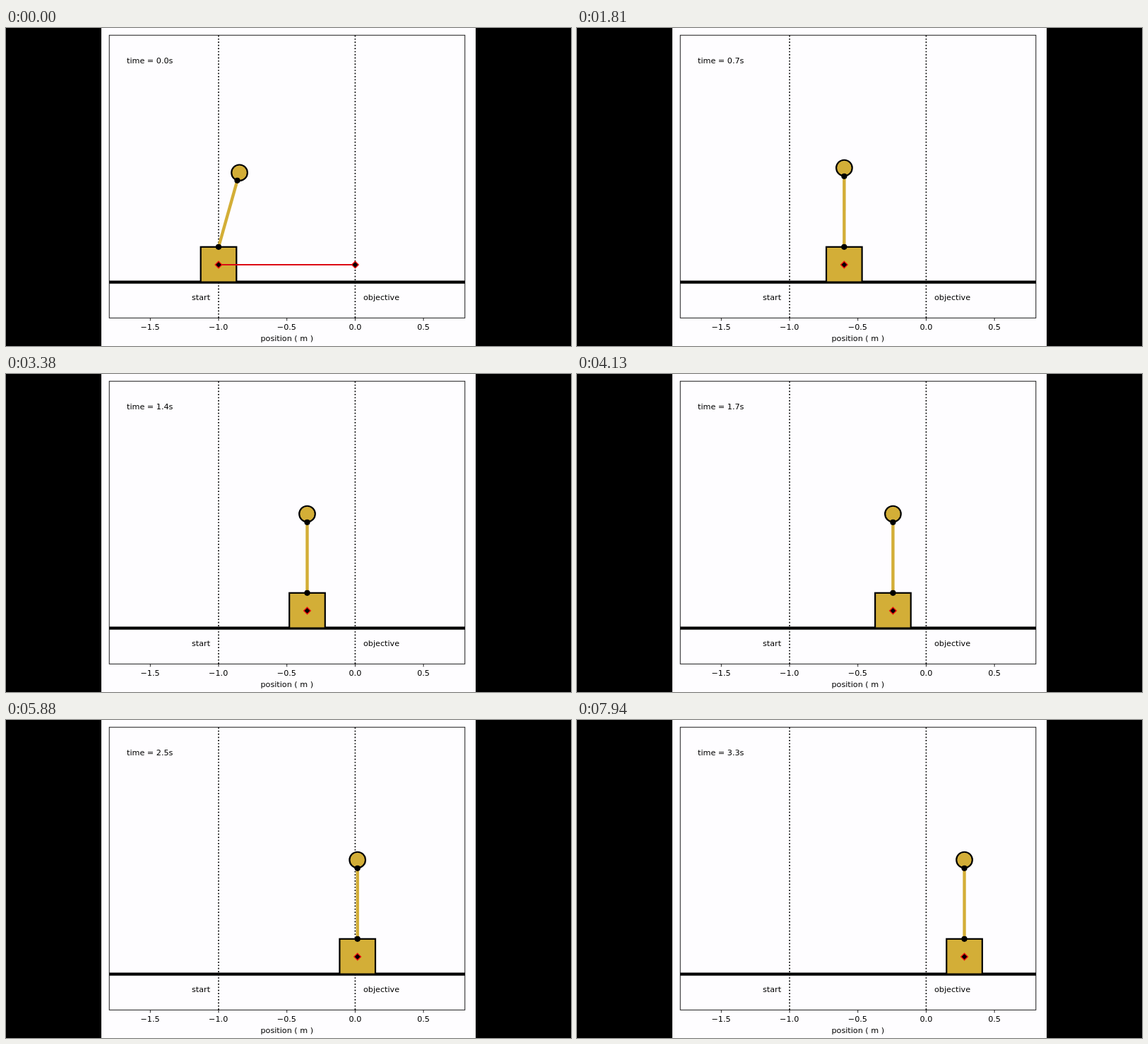
Recreate the animation shown at these times as an HTML page. Size 800 px wide and 450 px high, loop 8 s.

```html
<!DOCTYPE html>
<html lang="en">
<head>
<meta charset="utf-8">
<title>Inverted pendulum</title>
<style>
  html, body { margin: 0; width: 100%; height: 100%; overflow: hidden; background: #000; }
  svg { display: block; width: 800px; height: 450px; }
  text { font: 11.2px "DejaVu Sans", sans-serif; fill: #000; }
  .mid { text-anchor: middle; }
  .axis { fill: none; stroke: #000; stroke-width: 0.9; }
  .dots { stroke: #000; stroke-width: 1.7; stroke-dasharray: 1.67 2.75; }
  .gold { fill: #d3ae37; stroke: #000; stroke-width: 2.2; }
  .mark { fill: #000; stroke: #f01010; stroke-width: 1.3; }
</style>
</head>
<body>
<svg viewBox="0 0 800 450">
  <rect x="135" width="530" height="450" fill="#fefdff"/>
  <path class="dots" d="M301 410V10M494.4 410V10"/>
  <path d="M146 359.6H650" stroke="#000" stroke-width="4.3"/>
  <rect class="axis" x="146.2" y="10.2" width="503.6" height="400.1"/>
  <g id="ticks"></g>
  <text class="mid" x="397.8" y="443">position ( m )</text>
  <text x="263" y="385">start</text>
  <text x="506" y="385">objective</text>
  <text id="clock" x="171" y="50"></text>

  <rect id="cart" class="gold" x="-25.3" y="309.8" width="50.6" height="49.8"/>
  <line id="rod" y1="309.8" stroke="#d3ae37" stroke-width="4.4"/>
  <circle id="ball" class="gold" r="11.3"/>
  <circle id="pivot" cy="309.8" r="4.1"/>
  <circle id="tip" r="4.1"/>
  <g id="goal">
    <path d="M301 335H494.4" stroke="#dc0a14" stroke-width="2.2"/>
    <path class="mark" d="M494.4 330.2l4.8 4.8l-4.8 4.8l-4.8 -4.8z"/>
  </g>
  <path id="centre" class="mark" d="M0 330.2l4.8 4.8l-4.8 4.8l-4.8 -4.8z"/>
</svg>
<script>
const $ = id => document.getElementById(id);
const set = (id, attrs) => {
  for (const name in attrs) $(id).setAttribute(name, attrs[name]);
};

const LOOP = 8000, METRE_X = 193.4, METRE_Y = 250;
const START_X = 301, PIVOT_Y = 309.8, TILT = Math.PI / 9;
const DECAY = 3.5, CATCH_END = 29;

// Cart centre after the pole has been caught: [step, x]
const DRIFT = [
  [29, 378.3], [39, 398.7], [43, 406], [52, 423], [66, 447.4], [78, 469.9],
  [91, 492], [94, 497.7], [104, 513.2], [114, 527], [127, 548.5]
];

$("ticks").innerHTML = [-1.5, -1, -0.5, 0, 0.5].map(v => {
  const x = 494.4 + v * METRE_X;
  return `<path class="axis" d="M${x} 410.3v4"/>` +
    `<text class="mid" x="${x - (v < 0 ? 0.3 : 0)}" y="426.7">${v.toFixed(1).replace("-", "\u2212")}</text>`;
}).join("");

function interpolate(table, k) {
  const i = Math.max(1, table.findIndex(p => p[0] >= k));
  const [k0, x0] = table[i - 1], [k1, x1] = table[i];
  return x0 + (x1 - x0) * (k - k0) / (k1 - k0);
}

// Critically damped return of the pole to upright
const lean = k => (1 + k / DECAY) * Math.exp(-k / DECAY);

function cartX(k) {
  if (k >= CATCH_END) return interpolate(DRIFT, k);
  const glide = k - 1.5 * DECAY + (1.5 * DECAY + k / 2) * Math.exp(-k / DECAY);
  return START_X + 27 * (1 - lean(k)) + 2.118 * glide;
}

function draw(ms) {
  // 16 steps a second, on a 10 ms grid
  const k = Math.ceil((Math.floor(ms / 10) + 0.5) / 6.25) - 1;
  const x = cartX(k), angle = TILT * lean(k);
  const along = r => [x + r * METRE_X * Math.sin(angle), PIVOT_Y - r * METRE_Y * Math.cos(angle)];
  const [tx, ty] = along(0.4), [bx, by] = along(0.447);

  set("cart", { transform: `translate(${x})` });
  set("centre", { transform: `translate(${x})` });
  set("rod", { x1: x, x2: tx, y2: ty });
  set("pivot", { cx: x });
  set("tip", { cx: tx, cy: ty });
  set("ball", { cx: bx, cy: by });
  set("goal", { visibility: k ? "hidden" : "visible" });
  const tenths = Math.floor(0.265 * k + 0.12);
  $("clock").textContent = `time = ${(tenths / 10).toFixed(1)}s`;
}

const begin = performance.now();
function tick() {
  draw((performance.now() - begin) % LOOP);
  requestAnimationFrame(tick);
}
draw(0);
requestAnimationFrame(tick);
</script>
</body>
</html>
```
